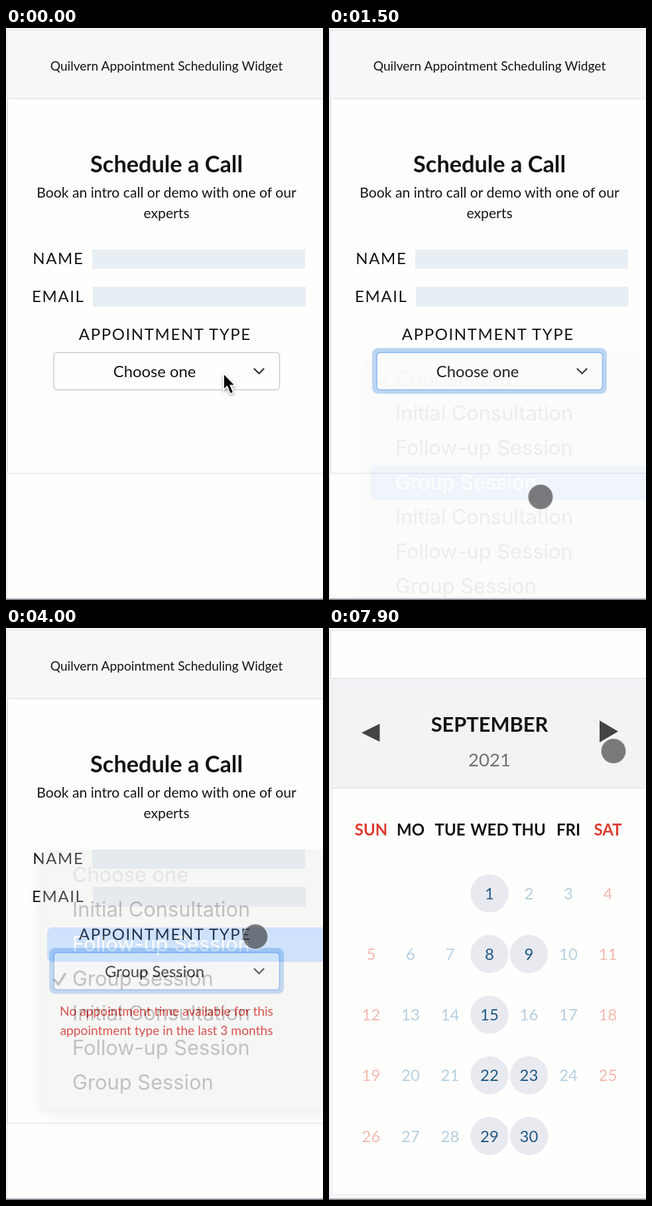
Recreate the animation shown at these times as an HTML page. Size 478 px wide and 860 px high, loop 8 s.

```html
<!DOCTYPE html>
<html lang="en">
<head>
<meta charset="utf-8">
<title>Appointment widget</title>
<style>
html, body { margin: 0; width: 100%; height: 100%; overflow: hidden; background: #fefefd; }
svg { display: block; width: 478px; height: 860px; font-family: Lato, sans-serif; fill: #141414; }
.mid { text-anchor: middle; }
.line { fill: none; stroke: #dfdfe8; }
.label { font-size: 24px; letter-spacing: 1.6px; }
.bold { font-weight: 700; }
.menu text { font: 30.8px Inter, sans-serif; }
.panel { fill: #dfdfe0; stroke: #c4c4c6; filter: drop-shadow(0 6px 12px #0004); }
.check { fill: none; stroke-width: 3.5; stroke-linecap: round; stroke-linejoin: round; }
</style>
</head>
<body>
<svg id="stage" viewBox="0 0 478 860"></svg>
<script>
const LOOP = 8000, SCROLL = 594, ROW = 52;
const stage = document.getElementById('stage');

const text = (x, y, size, str, cls = 'mid', extra = '') =>
  `<text x="${x}" y="${y}" font-size="${size}" class="${cls}" ${extra}>${str}</text>`;
const rect = (x, y, w, h, extra) =>
  `<rect x="${x}" y="${y}" width="${w}" height="${h}" ${extra}/>`;

const column = i => 63.5 + 59.5 * i;
const weekend = i => i % 7 === 0 || i % 7 === 6;

function month(id, first, count, open) {
  let out = '';
  for (let d = 1; d <= count; d++) {
    const cell = d + first - 1;
    const x = column(cell % 7), y = 993 + 91.2 * Math.floor(cell / 7);
    const free = open.includes(d);
    if (free) out += `<circle cx="${x}" cy="${y}" r="28.7" fill="#e9eaf0"/>`;
    const color = free ? '#1f5a86' : weekend(cell) ? '#f4bab0' : '#b6d0e0';
    out += text(x, y + 8.7, 24, d, 'mid', `fill="${color}"`);
  }
  return `<g id="${id}">${out}</g>`;
}

const items = ['Choose one', ...Array(2).fill(['Initial Consultation', 'Follow-up Session', 'Group Session']).flat()];

// Row centres are relative to the first item.
function menu(id, top, checked) {
  const y = checked * ROW, color = checked ? '#141414' : '#9a9a9a';
  return `<g id="${id}" class="menu" transform="translate(0 ${top})">
    <rect class="panel" x="51.5" y="-35.5" width="470" height="388" rx="11"/>
    ${rect(62, -25, 440, ROW, 'rx="8" class="hover" fill="#4592f7"')}
    <path class="check" stroke="${color}" d="M73 ${y + 2}l6 7L89 ${y - 7}"/>
    ${items.map((s, i) => text(100, i * ROW + 11, 30.8, s, 'item')).join('')}
  </g>`;
}

const days = ['SUN', 'MO', 'TUE', 'WED', 'THU', 'FRI', 'SAT'];

stage.innerHTML = `
<clipPath id="view"><rect x="0" y="3" width="478" height="854"/></clipPath>
${rect(0, 0, 478, 860, 'fill="#fefefd"')}
${rect(0, 0, 478, 3, 'fill="#f7f7fa"')}
<g clip-path="url(#view)"><g id="page">
  ${rect(2, 3, 480, 103, 'fill="#f7f7fa"')}
  ${text(242, 64, 19.2, 'Quilvern Appointment Scheduling Widget')}
  <path id="box" class="line"/>
  ${text(242, 217, 34.3, 'Schedule a Call', 'mid bold')}
  ${text(242, 254.5, 21.2, 'Book an intro call or demo with one of our')}
  ${text(242, 285.5, 21.2, 'experts')}
  ${text(78.8, 355, 24, 'NAME', 'mid label')}
  ${text(78.8, 412, 24, 'EMAIL', 'mid label')}
  ${rect(130, 333, 321, 29, 'fill="#e8eff4"')}
  ${rect(131, 389, 321, 30, 'fill="#e8eff4"')}
  ${text(239.8, 469, 24, 'APPOINTMENT TYPE', 'mid label')}
  ${rect(65, 481, 354, 69, 'id="ring" rx="9" fill="#bad6f5"')}
  ${rect(72, 488, 340.5, 56, 'id="select" rx="5" fill="#fefefe" stroke-width="1.6"')}
  ${text(224, 525, 23.8, '', 'mid', 'id="choice"')}
  <path d="M374.5 512.5l7 7l7-7" fill="none" stroke="#2c2c2c" stroke-width="2.2" stroke-linecap="round"/>
  <g id="error" fill="#d8221c">
    ${text(242, 583, 19.2, 'No appointment time available for this')}
    ${text(242, 612, 19.2, 'appointment type in the last 3 months')}
  </g>
  <g id="calendar">
    ${rect(4.5, 669.5, 480, 777, 'class="line"')}
    ${rect(4.5, 669.5, 480, 165, 'fill="#f3f3f6" stroke="#d9d9e0"')}
    ${text(242, 750, 30.8, '', 'mid bold', 'id="title"')}
    ${text(242, 802, 27.6, '2021', 'mid', 'fill="#727272"')}
    <path d="M49 751.5l27.5-13.5v27zM408 733v33l28-16.5z" fill="#444"/>
    ${days.map((d, i) => text(column(i), 905.5, 24, d, 'mid bold', weekend(i) ? 'fill="#dc3a2e"' : '')).join('')}
    ${month('august', 0, 31, [])}
    ${month('september', 3, 30, [1, 8, 9, 15, 22, 23, 29, 30])}
  </g>
</g>
<rect id="thumb" x="471" width="5.5" height="488" rx="1" fill="#d9d9e0"/>
</g>
<path class="line" d="M1.5 857V3.5H478M1 856.5H478"/>
${menu('menuA', 527, 0)}
${menu('menuB', 371, 3)}
${rect(0, 858, 478, 2, 'fill="#85858d"')}
<circle id="dot" r="19" fill="#2e2e30" fill-opacity=".62" stroke="#fff" stroke-opacity=".5" stroke-width="2"/>
<path id="arrow" d="M328 519v25l5.5-5l4.5 11l5-2l-4.5-10.5h7.5z" fill="#000" stroke="#fff" stroke-width="1.8"
  style="filter:drop-shadow(0 2px 2px #0005)"/>`;

const $ = id => document.getElementById(id);
const show = (id, on) => $(id).setAttribute('opacity', +on);
const ramp = (t, a, b) => Math.min(1, Math.max(0, (t - a) / (b - a)));
const ease = u => u * u * (3 - 2 * u);

// Pointer path: time, x, y
const path = [
  [200, 329, 530], [480, 318, 597], [700, 318, 600], [1200, 319, 705], [2900, 319, 705],
  [3200, 376, 520], [3400, 376, 515], [3700, 376, 464], [6300, 376, 464],
  [6700, 68, 680], [7150, 429, 150], [7350, 429, 150], [7550, 435, 165], [7800, 429, 185]
];

function pointer(t) {
  const i = path.findIndex(p => p[0] > t);
  if (i === 0) return path[0].slice(1);
  if (i < 0) return path.at(-1).slice(1);
  const [a, b] = [path[i - 1], path[i]];
  const u = ease(ramp(t, a[0], b[0]));
  return [a[1] + (b[1] - a[1]) * u, a[2] + (b[2] - a[2]) * u];
}

function drawMenu(id, t, start, close, top, y) {
  show(id, t < start ? 0 : 1 - ramp(t, close, close + 270));
  const row = Math.round((y - top) / ROW), g = $(id);
  const hover = g.querySelector('.hover');
  hover.setAttribute('y', row * ROW - 25);
  hover.setAttribute('opacity', +(row > 0));
  g.querySelectorAll('.item').forEach((el, i) =>
    el.setAttribute('fill', i === 0 ? '#9a9a9a' : i === row ? '#fff' : '#141414'));
}

function draw(t) {
  const [x, y] = pointer(t);
  const focus = t >= 100;
  const failed = t >= 2200 && t < 4300;
  const next = t >= 7350;
  // A quick flick that runs to the end of the page
  const scroll = SCROLL * ease(ramp(t, 5351, 5686));

  $('page').setAttribute('transform', `translate(0 ${-scroll})`);
  $('box').setAttribute('d', `M480 106.5H2.5V${failed ? 744.5 : 669.5}H480`);
  $('choice').textContent = t < 1600 ? items[0] : t < 4150 ? items[3] : items[2];
  $('select').setAttribute('stroke', focus ? '#86b7ee' : '#ccced2');
  show('ring', focus);
  show('error', failed);

  show('calendar', t >= 4700);
  $('title').textContent = next ? 'SEPTEMBER' : 'AUGUST';
  show('august', !next);
  show('september', next);
  $('thumb').setAttribute('y', 5 + scroll * 855 / 1449);
  show('thumb', ramp(t, 5340, 5400) * (1 - ramp(t, 6100, 6300)));

  drawMenu('menuA', t, 200, 1250, 527, y);
  drawMenu('menuB', t, 3250, 3800, 371, y);

  show('arrow', t < 200);
  show('dot', (t >= 200 && t < 2400) || t >= 3000);
  $('dot').setAttribute('transform', `translate(${x} ${y})`);
}

const began = performance.now();
function tick() {
  draw((performance.now() - began) % LOOP);
  requestAnimationFrame(tick);
}
tick();
</script>
</body>
</html>
```
